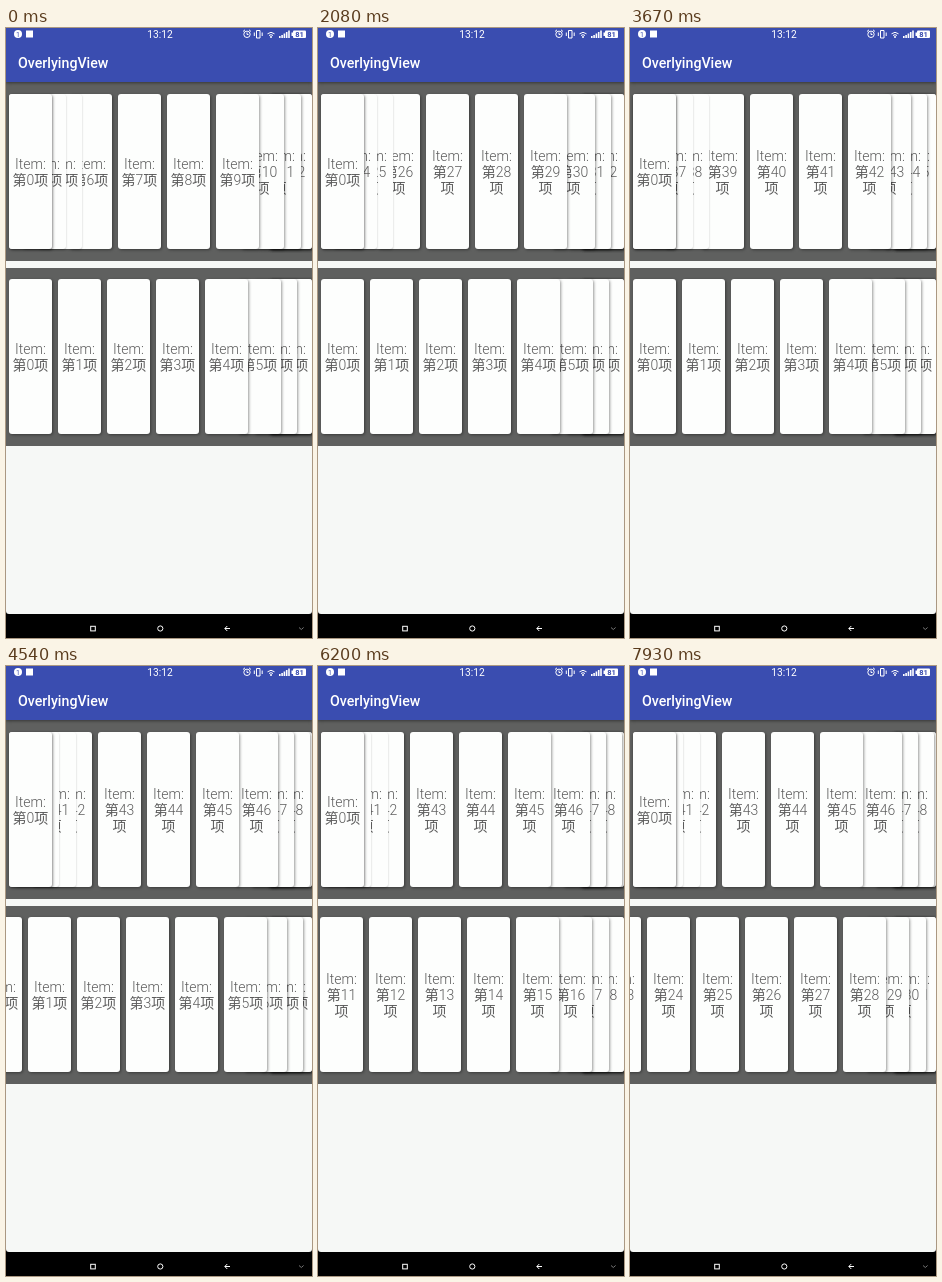
Write an HTML page that moves like this. It is 306x610 px and loops after 8 s.

```html
<!DOCTYPE html>
<html lang="zh">
<head>
<meta charset="utf-8">
<title>OverlyingView</title>
<style>
  html, body { margin: 0; width: 100%; height: 100%; overflow: hidden; background: #000; }
  #stage { position: absolute; left: 0; top: 0; width: 306px; height: 610px; overflow: hidden; background: #000;
    font-family: Roboto, "Noto Sans CJK SC", "Noto Sans CJK", sans-serif; }
  #screen { position: absolute; width: 306px; height: 586px; background: #f6f8f6; border-radius: 0 0 3px 3px; }
  #bar { position: absolute; z-index: 2; width: 306px; height: 54px; background: #3a4db0;
    box-shadow: 0 1px 3px rgba(0,0,0,.45); }
  #title { position: absolute; left: 12px; top: 25px; line-height: 20px; font-size: 14.2px; font-weight: 500; color: #fff; }
  .row { position: absolute; left: 0; width: 306px; overflow: hidden; background: #5f605f; isolation: isolate; }
  .card { position: absolute; left: 0; top: 11px; width: 43px; height: 155px; border-radius: 3px; background: #fdfefd;
    box-shadow: 1px 1px 3px rgba(0,0,0,.4); display: flex; flex-direction: column; justify-content: center;
    text-align: center; font-size: 14px; font-weight: 300; color: #5c5c5c; }
  .card.low { box-shadow: 0 1px 2px rgba(0,0,0,.25); }
  .card div { height: 16px; line-height: 16px; white-space: nowrap; }
  svg { position: absolute; left: 0; top: 0; z-index: 3; }
</style>
</head>
<body>
<div id="stage">
  <div id="screen">
    <div id="bar"><div id="title">OverlyingView</div></div>
    <div class="row" style="top:54px;height:179px;padding-top:1px;box-sizing:border-box"></div>
    <div class="row" style="top:240px;height:178px"></div>
  </div>
  <svg width="306" height="610" fill="none" stroke="#fff">
    <g stroke="none" fill="#fff">
      <circle cx="12" cy="6" r="4"/>
      <text x="12" y="8.5" font-size="7" text-anchor="middle" fill="#3a4db0">1</text>
      <rect x="20" y="2.5" width="7" height="7"/>
      <text x="154" y="10" font-size="10.2" text-anchor="middle">13:12</text>
      <path d="M273 10V8h1.6v2zm2.3 0V7h1.6v3zm2.3 0V5.5h1.6V10zm2.3 0V4h1.6v6zm2.3 0V2.500h1.6V10z"/>
      <rect x="287" y="2.500" width="13" height="7.500" rx="1"/>
      <rect x="285.500" y="4.500" width="1.500" height="3.500"/>
      <text id="charge" x="293.500" y="9" font-size="7.500" font-weight="700" text-anchor="middle" fill="#3a4db0">81</text>
      <circle cx="265" cy="9" r="1"/>
    </g>
    <circle cx="241" cy="6.300" r="3.200"/>
    <path d="M241 4.500v2h1.500M237 3.500l2-1.700M245 3.500l-2-1.700"/>
    <path d="M250.500 2.500h3.500v7.500h-3.500zM248.300 4.500v3.500M256.200 4.500v3.500"/>
    <path d="M261.500 5.800q3.500-3 7 0M263 7.500q2-1.700 4 0"/>
    <rect x="84.700" y="598.300" width="4.600" height="4.600"/>
    <circle cx="154.300" cy="600.500" r="2.600"/>
    <path d="M224 600.500h-5M221.300 598l-2.500 2.500 2.500 2.500"/>
    <path d="M293 599.500l2.300 2 2.300-2" stroke="#777"/>
  </svg>
</div>
<script>
const LOOP = 8000, PITCH = 49, EDGE = 3, LAST = 263, COUNT = 60;

// Runs of keys: [time, scroll, speed, steps to the next key]
const TOP = [
  [[0, 234, 0, 1]],
  [[80, 294, 0.9, 16], [1160, 922, 0.28, 6], [1570, 978, 0, 1]],
  [[1810, 1040, 0.85, 15], [2930, 1706, 0.37, 10], [3670, 1843, 0, 1]],
  [[3860, 1880, 0.55, 8], [4400, 2018, 0, 1]]
];
const BOTTOM = [
  [[0, 0, 0, 1]],
  [[4540, 30, 0.22, 14], [5540, 259, 0.35, 20], [6890, 896, 0.36, 15], [7930, 1162, 0.2, 1]]
];

function hermite(a, b, p) {
  const d = b[0] - a[0], q = 1 - p;
  return a[1] * (1 + 2 * p) * q * q + b[1] * p * p * (3 - 2 * p)
    + d * (a[2] * p * q * q - b[2] * p * p * q);
}

function scrollAt(runs, t) {
  const run = runs.filter(r => r[0][0] <= t).pop();
  const i = run.filter(k => k[0] <= t).length - 1;
  const a = run[i], b = run[i + 1];
  if (!b) return a[1];
  const p = Math.floor((t - a[0]) / (b[0] - a[0]) * a[3]) / a[3];
  return hermite(a, b, p);
}

// Cards near an end move at a third of the speed and pile up
function place(u, stackLeft) {
  if (u > 223.5) return Math.min(LAST, 149 + u / 3);
  if (stackLeft && u < 42.75) return Math.max(EDGE, 28.5 + u / 3);
  return u;
}

function makeCards(row) {
  return Array.from({ length: COUNT }, (_, i) => {
    const card = document.createElement('div');
    card.className = 'card';
    card.style.zIndex = COUNT - i;
    const lines = i < 10 ? [`第${i}项`] : [`第${i}`, '项'];
    for (const line of ['Item:', ...lines]) {
      card.appendChild(document.createElement('div')).textContent = line;
    }
    row.appendChild(card);
    return card;
  });
}

const rows = [...document.querySelectorAll('.row')].map((el, i) => ({
  cards: makeCards(el), runs: i ? BOTTOM : TOP, stackLeft: !i
}));
rows[0].cards.forEach(c => c.style.top = '12px');
const charge = document.getElementById('charge');

function draw(t) {
  for (const { cards, runs, stackLeft } of rows) {
    const scroll = scrollAt(runs, t);
    cards.forEach((card, i) => {
      const u = EDGE + PITCH * i - scroll;
      const x = place(u, stackLeft);
      const seen = u < 480 && (stackLeft ? i < 2 || x > EDGE : x > -48);
      card.style.display = seen ? 'flex' : 'none';
      card.style.transform = `translateX(${Math.round(x)}px)`;
      card.classList.toggle('low', stackLeft && i > 0 && u < 42);
    });
  }
  charge.style.display = t >= 2660 && t < 3520 ? 'none' : '';
}

const start = performance.now();
function tick() {
  draw((performance.now() - start) % LOOP);
  requestAnimationFrame(tick);
}
tick();
</script>
</body>
</html>
```
